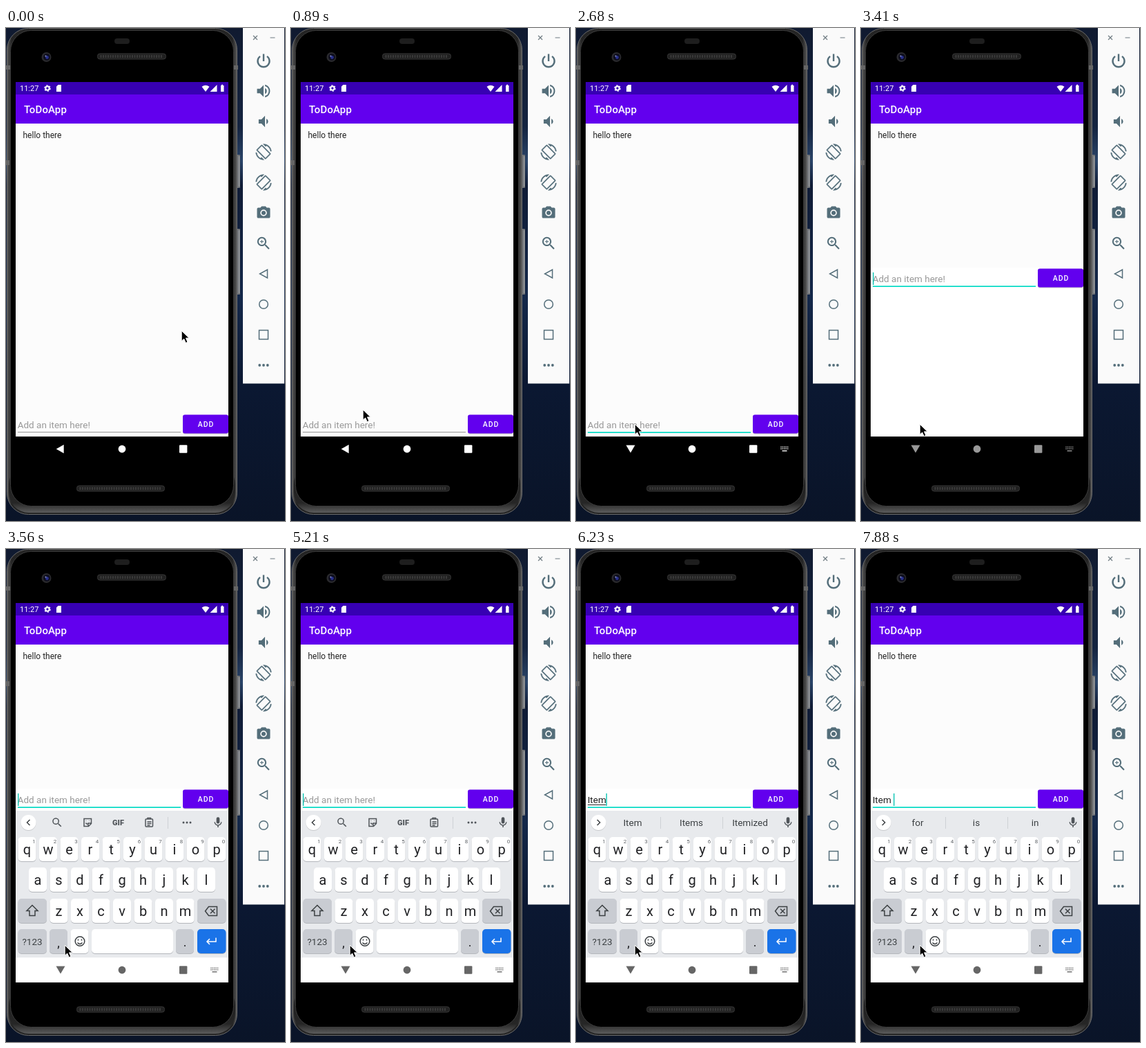
These frames come from a looping animation (404 by 712 pixels, 8000 ms). An HTML page:

```html
<!DOCTYPE html>
<html lang="en">
<head>
<meta charset="utf-8">
<title>To-do app</title>
<style>
html, body { margin: 0; width: 100%; height: 100%; overflow: hidden; background: #0b1730; }
svg { display: block; font-family: Roboto, sans-serif; }
.mid { text-anchor: middle; }
.line { fill: none; stroke-width: 1.5; }
.caps { text-transform: uppercase; }
</style>
</head>
<body>
<svg id="stage" width="404" height="712" viewBox="0 0 404 712"></svg>
<script>
const rect = (x, y, w, h, fill, r = 0, more = '') =>
  `<rect x="${x}" y="${y}" width="${w}" height="${h}" rx="${r}" fill="${fill}" ${more}/>`;
const text = (x, y, size, fill, str, more = '') =>
  `<text x="${x}" y="${y}" font-size="${size}" fill="${fill}" ${more}>${str}</text>`;
const mid = (x, y, size, fill, str, more = '') => text(x, y, size, fill, str, 'class="mid" ' + more);
const dot = (x, y, r, fill, more = '') => `<circle cx="${x}" cy="${y}" r="${r}" fill="${fill}" ${more}/>`;
const path = (d, more = '') => `<path d="${d}" ${more}/>`;
const group = (id, body, more = '') => `<g id="${id}" ${more}>${body}</g>`;
// Icon drawn on a 24-unit grid, centred on x, y
const icon = (x, y, d, scale = 0.95, flip = 1, more = '') =>
  path(d, `fill-rule="evenodd" transform="translate(${x} ${y}) scale(${scale * flip} ${scale}) translate(-12 -12)" ${more}`);
const dots = (x, y, gap, r, fill) => [-1, 0, 1].map(i => dot(x + i * gap, y, r, fill)).join('');

const slate = '#546e7a';
const lens = 'M15.5 14h-.79l-.28-.27A6.5 6.5 0 1 0 13.73 14.43l.27.28v.79l5 4.99L20.49 19zm-6 0a4.5 4.5 0 1 1 0-9 4.5 4.5 0 0 1 0 9z';
const mic = 'M12 14c1.66 0 3-1.34 3-3V5a3 3 0 0 0-6 0v6c0 1.66 1.34 3 3 3zm5.3-3c0 3-2.54 5.1-5.3 5.1S6.7 14 6.7 11H5c0 3.41 2.72 6.23 6 6.72V21h2v-3.28c3.28-.48 6-3.3 6-6.72z';

function phone() {
  const grille = (x, y, w) => rect(x, y, w, 8, '#202020', 3.5, 'stroke="#363636"') +
    path(`M${x + 4} ${y + 4}h${w - 8}`, 'stroke="#3a3a3a" stroke-width="4" stroke-dasharray="2 1.5"');
  const button = (y, h) => rect(334, y, 5, h, '#6f7276', 1) + rect(337, y + 2, 1, h - 4, '#a5a8ab');
  return `<defs>
    <linearGradient id="sky" x2="0" y2="1"><stop stop-color="#101a30"/><stop offset=".2" stop-color="#152440"/>
      <stop offset=".27" stop-color="#2a4468"/><stop offset=".32" stop-color="#101c36"/>
      <stop offset=".55" stop-color="#14284a"/><stop offset=".72" stop-color="#0b1832"/><stop offset="1" stop-color="#0a1428"/></linearGradient>
    <linearGradient id="rim"><stop stop-color="#5a5a5a"/><stop offset=".02" stop-color="#242424"/>
      <stop offset=".98" stop-color="#242424"/><stop offset="1" stop-color="#5a5a5a"/></linearGradient>
    <linearGradient id="chin" x2="0" y2="1"><stop stop-color="#1c1c1c"/><stop offset=".8" stop-color="#262626"/><stop offset="1" stop-color="#5c5c5c"/></linearGradient>
    </defs>` +
    rect(0, 0, 404, 712, 'url(#sky)') + button(183, 48) + button(290, 95) +
    rect(1.5, .5, 333, 702, 'url(#rim)', 31, 'stroke="#6a6a6a"') +
    rect(4, 630, 328, 70, 'url(#chin)', 29) +
    rect(6.5, 3.5, 323, 687, '#000', 30, 'stroke="#3c3c3c"') +
    rect(0, 54, 6, 6, '#666') + rect(330, 54, 6, 6, '#666') + rect(0, 191, 5, 7, '#666') +
    rect(157, 15, 22, 8, '#1e1e1e', 4) + grille(132.5, 37, 99) + grille(102.5, 661, 127) +
    dot(58.5, 42, 7, '#2a2a2d') + dot(59, 42, 4.8, '#0c0c1c') + dot(59.5, 42.5, 2.4, '#28308a') + dot(57.5, 40.5, 1.1, '#8c96d0');
}

function toolbar() {
  const speaker = x => `M${x} 9v6h4l5 5V4l-5 5z`;
  const wave = x => `M${x} 12a4.5 4.5 0 0 0-2.5-4.03v8.05a4.5 4.5 0 0 0 2.5-4.02z`;
  const tilted = 'M16.48 2.52c3.27 1.55 5.61 4.72 5.97 8.48h1.5C23.44 4.84 18.29 0 12 0l-.66.03 3.81 3.81zM10.23 1.75a1.5 1.5 0 0 0-2.12 0L1.75 8.11a1.5 1.5 0 0 0 0 2.12l12.02 12.02a1.5 1.5 0 0 0 2.12 0l6.36-6.36a1.5 1.5 0 0 0 0-2.12zm4.6 19.44L2.81 9.17l6.36-6.36 12.02 12.02zm-7.31.29C4.25 19.94 1.91 16.76 1.55 13H.05C.56 19.16 5.71 24 12 24l.66-.03-3.81-3.81z';
  const rotate = (y, flip) => icon(373, y, tilted, 0.95, flip, `stroke="${slate}" stroke-width=".4"`);
  return rect(343, 0, 60, 513.5, '#fafafa') +
    path('M358 11l6 6m0-6l-6 6M382.5 14h7', 'class="line" stroke="#6f7b82" style="stroke-width:1.2"') +
    group('tools',
      path('M368 40.9a8.5 8.5 0 1 0 10 0M373 37.5v10.5', `fill="none" stroke="${slate}" stroke-width="2.4"`) +
      icon(373, 91, speaker(3) + wave(16.5) + 'M14 3.23v2.06a7 7 0 0 1 0 13.42v2.06a9 9 0 0 0 0-17.54z', 1.05) +
      icon(373, 135, speaker(5) + wave(18.5), 1.02) +
      rotate(179, 1) + rotate(223, -1) +
      icon(373, 267, 'M9 2L7.17 4H4a2 2 0 0 0-2 2v12a2 2 0 0 0 2 2h16a2 2 0 0 0 2-2V6a2 2 0 0 0-2-2h-3.17L15 2zm3 15a5 5 0 1 1 0-10 5 5 0 0 1 0 10zm0-1.8a3.2 3.2 0 1 0 0-6.4 3.2 3.2 0 0 0 0 6.4z') +
      icon(373, 311, lens + 'M12 10h-2v2H9v-2H7V9h2V7h1v2h2z', 1.02) +
      `<g class="line" stroke="${slate}">${path('M378.5 349v12l-11-6z') + dot(373, 399, 6.3, 'none') + rect(366.5, 436.5, 13, 13, 'none')}</g>` +
      dots(373, 487, 5.8, 1.9, slate), `fill="${slate}"`);
}

function app() {
  const gear = dot(60, 87, 2.7, 'none', 'stroke="#fff" stroke-width="2"') +
    dot(60, 87, 4.2, 'none', 'stroke="#fff" stroke-width="1.3" stroke-dasharray="2.2"');
  return rect(14, 78, 308, 512, '#fcfcfc') + rect(14, 78, 308, 18, '#3700b3') + rect(14, 96, 308, 42, '#6200ee') +
    text(20, 91, 11, '#fff', '11:27') + gear +
    path('M75.5 82H80v10h-7v-7.5zM289 92l-5.5-7.3q5.5-4 11 0zM305.5 82v10h-10zM311 83h1v-1.2h2.2V83h1.3v9H311z', 'fill="#fff"') +
    text(26, 123, 15, '#fff', 'ToDoApp', 'font-weight="500" letter-spacing=".15"') +
    text(24.5, 159, 12, '#222', 'hello there') +
    group('white', rect(14, 346, 308, 244, '#fff')) +
    group('field',
      text(16.7, 578, 13.5, '#999', 'Add an item here!', 'id="hint"') + text(16.7, 578, 13.5, '#222', '', 'id="typed"') +
      rect(17, 580, 26.5, 1, '#222', 0, 'id="mark"') + rect(17, 583.3, 236, 1, '#8a8a8a', 0, 'id="rule"') +
      rect(17, 564, 1.5, 18, '#1cc9b9', 0, 'id="caret"') +
      rect(256, 559.5, 66, 27, '#000', 3, 'opacity=".2"') + rect(256, 558.5, 66, 27, '#6200ee', 3) +
      mid(289.5, 576, 10.5, '#fff', 'ADD', 'font-weight="500" letter-spacing=".94"'));
}

function keyboard() {
  const ink = '#202124', grey = '#c9ccd2';
  const key = (x, y, w, fill) => rect(x, y + 1, w, 35, '#b4b7bc', 5) + rect(x, y, w, 35, fill, 5);
  const row = (letters, x, y) => [...letters].map((c, i) => {
    const cx = x + i * 30.5;
    return key(cx - 13, y, 26, '#fff') + mid(cx, y + 25, 20, ink, c);
  }).join('');
  const digits = [...'1234567890'].map((c, i) => mid(40.5 + i * 30.5, 425, 8, '#5f6368', c)).join('');
  const split = x => rect(x, 387, 1, 17, '#ced1d5');
  return rect(14, 378, 308, 212, '#e8eaed') + rect(14, 590, 308, 36, '#fff') +
    dot(32.5, 396, 11, '#c8cacd') + dot(32.5, 395, 11, '#fff') +
    path('', 'id="chevron" class="line" stroke="#3c4043"') +
    `<g fill="#50555a">${icon(307, 395, mic, .78)}` +
    group('shortcuts', icon(74, 395, lens, .75) + mid(162.5, 399, 11, '#50555a', 'GIF', 'font-weight="900"') + dots(262, 395, 5, 1.5, '#50555a') + split(234) +
      `<g class="line" stroke="#50555a">${path('M113 389.5h10.5v7l-4 4H113zM123 396h-4v4M115.5 395.5q2 3 4.5 .5M115.7 392.5h.5m4 0h.5') +
        rect(202, 390, 10.5, 11, 'none', 1) + path('M205 390v-1.5h4.5v1.5M204.5 394h6m-6 2.5h6m-6 2.5h4')}</g>`) + '</g>' +
    group('words', split(122) + split(212) + [82, 167, 252].map(x => mid(x, 400, 13.5, '#3c4043', '')).join('')) +
    group('keys', row('qwertyuiop', 30.5, 416) + row('asdfghjkl', 46, 460) + row('zxcvbnm', 76.5, 505)) + digits +
    key(17.5, 505, 41.5, grey) + key(277, 505, 41.5, grey) + key(17.5, 549, 41.5, grey) + key(63, 549, 26, grey) +
    key(93.5, 549, 26, '#fff') + key(124, 549, 118, '#fff') + key(246, 549, 26, grey) + key(277, 549, 41.5, '#1a73e8') +
    mid(38, 571.5, 13.5, '#3c4043', '?123') + mid(76, 575, 18, ink, ',') + mid(259, 574, 18, ink, '.') +
    path('M38 514.5l8 8h-4v7h-8v-7h-4z', 'id="shift" class="line" stroke="#3c4043"') +
    `<g class="line" stroke="#3c4043">${path('M288.5 523l5-6.5h12v13h-12zM296 519.7l6.5 6.5m0-6.5l-6.5 6.5') +
      dot(107, 566.5, 6.8, 'none') + path('M103.5 568.5q3.5 4 7 0M104.5 563.5v2m5-2v2')}</g>` +
    path('M304 561.5v5.5h-13m4-4l-4 4 4 4', 'class="line" stroke="#fff"');
}

function nav() {
  const bits = [0, 1, 2, 3, 4].map(i => rect(296.3 + i * 2.4, 604.5, 1.4, 1.4, 'currentColor') + rect(296.3 + i * 2.4, 607, 1.4, 1.4, 'currentColor')).join('');
  return group('nav', path('M72.7 608l11-6.2v12.4z', 'id="back"') + path('M72.5 602.5h13l-6.5 11z', 'id="down"') +
    dot(168, 608, 5.4, 'currentColor') + rect(251, 602.3, 11.4, 11.4, 'currentColor', 1) +
    group('switcher', bits + rect(298.5, 610, 7, 1.4, 'currentColor')), 'fill="currentColor"');
}

const arrow = path('M-.8 .2v15l3.5-3.2 2.6 5.7 2.7-1.2-2.5-5.6h4.8z', 'fill="#000" stroke="#fff" stroke-linejoin="round"');
const stage = document.getElementById('stage');
stage.innerHTML = phone() + toolbar() + app() + group('board', keyboard()) + nav() + group('pointer', arrow);

const $ = id => document.getElementById(id);
const show = (id, on) => $(id).style.display = on ? '' : 'none';
const set = (id, attrs) => Object.entries(attrs).forEach(([k, v]) => $(id).setAttribute(k, v));
// Last entry whose start time has passed
const step = (list, t) => list.reduce((hit, e) => t >= e[0] ? e : hit);

const moves = [[0, 255, 437], [600, 227, 457], [750, 152, 520], [890, 105, 551], [1040, 73, 568], [1780, 83, 570], [1930, 86, 572]];
const typing = [[0, '', 17], [5510, 'I', 20.5], [5810, 'It', 25], [5960, 'Ite', 32], [6080, 'Item', 43.5], [7580, 'Item', 47]];
const hints = [[0, '', '', ''], [5510, 'I', 'In', 'It'], [5810, 'It', 'Its', 'Item'], [5960, 'Item', 'Items', 'Iteration'],
  [6080, 'Item', 'Items', 'Itemized'], [7880, 'for', 'is', 'in']];
const blinks = [[0, 0], [2230, 1], [2680, 0], [3130, 1], [3710, 0], [4160, 1], [4760, 0], [5210, 1], [6680, 0], [7130, 1]];
const navTones = [[0, '#fff'], [2980, '#e0e0e0'], [3130, '#c4c4c4'], [3260, '#a8a8a8'], [3410, '#999'], [3560, '#666']];

function draw(t) {
  const [, x, y] = step(moves, t), [, word, caretX] = step(typing, t);
  const focused = t >= 1930, raised = t >= 2980, open = t >= 3560, writing = word !== '';
  const caps = t >= 5360 && t < 5510;
  set('pointer', { transform: `translate(${x} ${y})` });
  set('field', { transform: `translate(0 ${raised ? -211 : 0})` });
  set('rule', focused ? { height: 1.7, fill: '#03dac5' } : { height: 1, fill: '#8a8a8a' });
  set('caret', { x: caretX });
  show('caret', step(blinks, t)[1]);
  show('white', raised);
  show('hint', !writing);
  show('mark', writing && t < 7880);
  $('typed').textContent = word;
  set('mark', { width: Math.max(2, Math.min(caretX, 43.5) - 17) });
  show('board', open);
  show('shortcuts', !writing);
  show('words', writing);
  document.querySelectorAll('#words text').forEach((el, i) => el.textContent = step(hints, t)[i + 1]);
  set('chevron', { d: writing ? 'M30.7 391l4 4-4 4' : 'M34.5 391l-4 4 4 4' });
  $('keys').classList.toggle('caps', caps);
  $('shift').style.fill = caps ? '#3c4043' : '';
  $('nav').style.color = step(navTones, t)[1];
  show('back', t < 2680);
  show('down', t >= 2680);
  show('switcher', t >= 2680);
}

const start = performance.now();
(function tick() {
  draw((performance.now() - start) % 8000);
  requestAnimationFrame(tick);
})();
</script>
</body>
</html>
```
